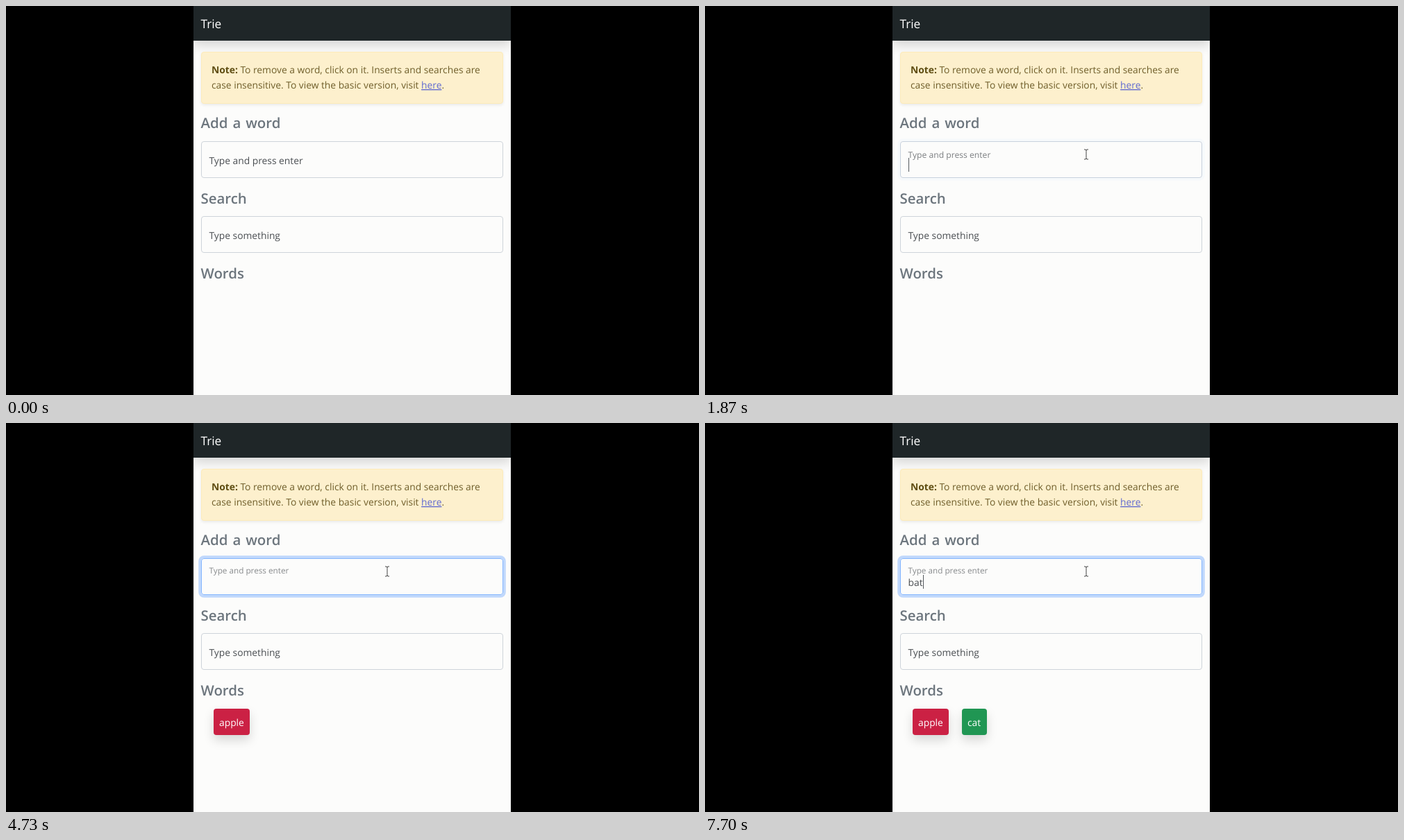
An HTML page that plays this animation: 998 px wide and 561 px high, repeating every 8000 ms.

```html
<!DOCTYPE html>
<html lang="en">
<head>
<meta charset="utf-8">
<title>Trie</title>
<style>
  html, body { margin: 0; width: 100%; height: 100%; overflow: hidden; background: #000; }
  #panel { position: absolute; left: 270px; top: 0; width: 457px; height: 561px; overflow: hidden; background: #fcfcfb; }
  #panel div { position: absolute; box-sizing: border-box; border-radius: 4px; }
  #panel .bar { left: 0; top: 0; width: 457px; height: 50px; border-radius: 0; background: #1f2628; box-shadow: 0 7.5px 15px rgba(0,0,0,.15); }
  .note { left: 11px; top: 66px; width: 435px; height: 75px; background: #fdf0cd; border: 1px solid #fdebb9; box-shadow: 0 2px 4px rgba(0,0,0,.075); }
  .field { left: 11px; width: 435px; height: 53px; border: 1px solid #ced4da; }
  .tag { top: 412px; height: 38px; box-shadow: 0 7.5px 15px rgba(0,0,0,.15); }
  svg { position: absolute; left: 0; top: 0; }
  text { font: 13.8px "Open Sans", "Noto Sans", sans-serif; fill: #4a4e52; text-rendering: geometricPrecision; white-space: pre; }
  .title { font-size: 17.3px; font-weight: 500; fill: #fff; }
  .head { font-size: 20.4px; font-weight: 600; fill: #6c757d; word-spacing: 1.7px; }
  .warn { fill: #6f5e2a; }
  .bold { font-weight: 700; fill: #5f4d12; }
  .link { fill: #5f6ad0; text-decoration: underline; }
  .white { fill: #fff; }
</style>
</head>
<body>
<div id="panel">
  <div class="bar"></div>
  <div class="note"></div>
  <div class="field" id="field" style="top:195px"></div>
  <div class="field" style="top:303px"></div>
  <div class="tag" id="tagApple" style="left:29px;width:52px;background:#cb2144"></div>
  <div class="tag" id="tagCat" style="left:100px;width:36px;background:#209653"></div>
</div>
<svg width="998" height="561" viewBox="0 0 998 561">
  <text class="title" x="280.5" y="32">Trie</text>
  <text class="warn" x="296" y="97"><tspan class="bold">Note:</tspan> To remove a word, click on it. Inserts and searches are</text>
  <text class="warn" x="296" y="119">case insensitive. To view the basic version, visit <tspan class="link">here</tspan>.</text>
  <text class="head" x="280.5" y="176">Add a word</text>
  <text class="head" x="280.5" y="285">Search</text>
  <text class="head" x="280.5" y="393">Words</text>
  <text id="label">Type and press enter</text>
  <text x="292.5" y="336">Type something</text>
  <text id="typed" x="292.5" y="235"></text>
  <rect id="caret" y="219" width="1" height="20" fill="#55595d"/>
  <text class="white" id="wordApple" x="307" y="437">apple</text>
  <text class="white" id="wordCat" x="378" y="437">cat</text>
  <path id="arrow" d="M.5 .5V14.6L3.7 11.6L5.9 16.8L8.1 15.8L5.9 10.8H10.2Z" fill="#fff" stroke="#333" stroke-width="1"/>
  <path id="beam" d="M-3 -7H-1L0 -6L1 -7H3M0 -6V6M-3 7H-1L0 6L1 7H3" fill="none" stroke="#444" stroke-width="1"/>
</svg>
<script>
const LOOP = 8000, SHOW = 1100, FOCUS = 1800, BLINK = 533;
const el = id => document.getElementById(id);
const clamp = v => Math.min(1, Math.max(0, v));
const span = (t, a, b) => clamp((t - a) / (b - a));
const smooth = p => p * p * (3 - 2 * p);
const mix = (a, b, p) => a + (b - a) * p;
const show = (id, on) => el(id).style.visibility = on ? "visible" : "hidden";

// Each word: key press times and the time of Enter
const words = [
  { text: "apple", keys: [2770, 3170, 3330, 3530, 3670], enter: 4100 },
  { text: "cat", keys: [5400, 5530, 5730], enter: 6330 },
  { text: "bat", keys: [7400, 7470, 7700], enter: LOOP }
];
const presses = [FOCUS, ...words.flatMap(w => w.keys)];

function pointer(t) {
  const rise = 1 - (1 - span(t, SHOW, 1470)) ** 2;
  const settle = smooth(span(t, 1470, 1780));
  const x = mix(590, 548, rise) + settle;
  const y = mix(498, 182, rise) + 32 * settle;
  const overField = (y >= 195 && y < 248) || (y >= 303 && y < 356);
  show("arrow", t >= SHOW && !overField);
  show("beam", t >= SHOW && overField);
  el("arrow").setAttribute("transform", `translate(${Math.round(x)} ${Math.round(y)})`);
  el("beam").setAttribute("transform", `translate(${Math.round(x)} ${Math.round(y)})`);
}

function focus(t) {
  const lift = smooth(span(t, FOCUS, 1900));
  const label = el("label");
  label.setAttribute("transform", `translate(292.5 ${mix(228, 216.5, lift)}) scale(${mix(1, .85, lift)})`);
  label.style.opacity = mix(1, .65, lift);
  const ring = smooth(span(t, 1850, 1965));
  const field = el("field").style;
  field.borderColor = `rgb(${mix(206, 134, ring)},${mix(212, 183, ring)},${mix(218, 254, ring)})`;
  field.boxShadow = `0 0 0 3.75px rgba(13,110,253,${.25 * ring})`;
}

function typing(t) {
  const word = words.find(w => t < w.enter);
  const typed = el("typed");
  typed.textContent = word.text.slice(0, word.keys.filter(k => k <= t).length);
  const width = typed.textContent ? typed.getComputedTextLength() : 0;
  el("caret").setAttribute("x", Math.round(292.5 + width));
  const last = presses.filter(k => k <= t).pop();
  show("caret", t >= FOCUS && Math.floor((t - last) / BLINK) % 2 === 0);
  ["Apple", "Cat"].forEach((name, i) => {
    show("tag" + name, t >= words[i].enter);
    show("word" + name, t >= words[i].enter);
  });
}

const start = performance.now();
function frame() {
  const t = (performance.now() - start) % LOOP;
  pointer(t);
  focus(t);
  typing(t);
  requestAnimationFrame(frame);
}
frame();
</script>
</body>
</html>
```
